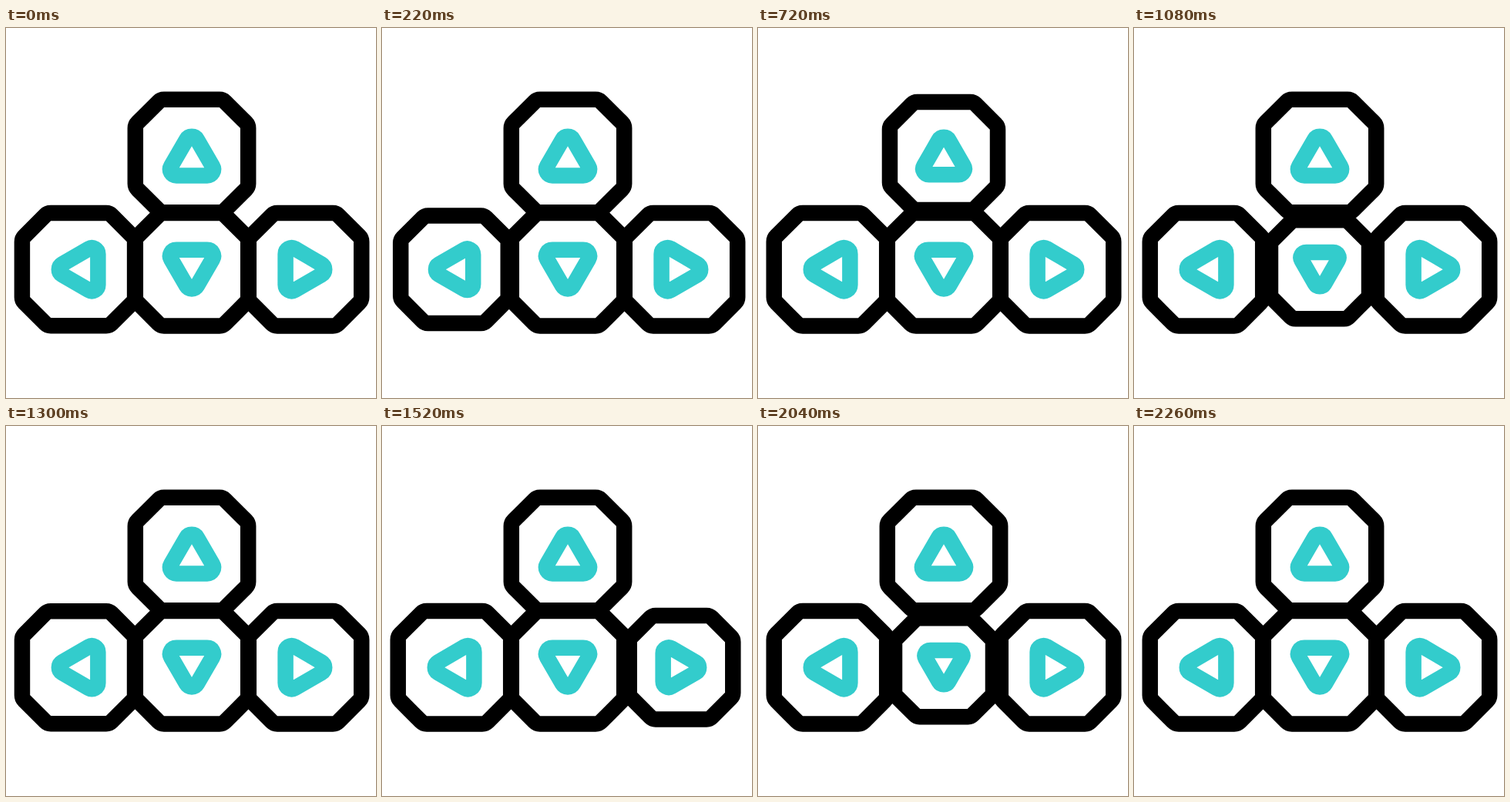
An HTML page with a canvas for the animation above (2400 ms loop, 480 by 480 pixels).

```html
<!DOCTYPE html>
<html lang="en">
<head>
<meta charset="utf-8">
<title>Arrow keys</title>
<style>
  html, body { margin: 0; width: 100%; height: 100%; overflow: hidden; background: #fff; }
  canvas { display: block; }
</style>
</head>
<body>
<canvas id="stage" width="480" height="480"></canvas>
<script>
const ctx = document.getElementById('stage').getContext('2d');
const LOOP = 2400, ROUND = 1100, STAGGER = 275;
// Each key is pressed twice: a slow tap, then a quick one.
const PRESS = [[0, 1], [100, 0.85], [200, 1], [267, 0.85], [333, 1]];

// In pressing order; turn is in quarter turns from "up".
const keys = [
  { x: 94, y: 313.2, turn: 3 },
  { x: 388, y: 313.2, turn: 1 },
  { x: 241, y: 166, turn: 0 },
  { x: 241, y: 313.2, turn: 2 }
];

const H = 73.2, F = 40.2;
const octagon = [[-F, -H], [F, -H], [H, -F], [H, F], [F, H], [-F, H], [-H, F], [-H, -F]];
const triangle = [[0, -33.2], [33.9, 25.4], [-33.9, 25.4]];

function pressScale(t) {
  for (let i = 1; i < PRESS.length; i++) {
    const [t0, s0] = PRESS[i - 1], [t1, s1] = PRESS[i];
    if (t >= t0 && t < t1) return s0 + (s1 - s0) * (t - t0) / (t1 - t0);
  }
  return 1;
}

function outline(points, radius, scale, color) {
  const p = points.map(([x, y]) => [x * scale, y * scale]);
  const n = p.length;
  ctx.beginPath();
  ctx.moveTo((p[0][0] + p[n - 1][0]) / 2, (p[0][1] + p[n - 1][1]) / 2);
  p.forEach((a, i) => ctx.arcTo(...a, ...p[(i + 1) % n], radius * scale));
  ctx.closePath();
  ctx.strokeStyle = color;
  ctx.stroke();
}

function draw(now) {
  const t = now % LOOP;
  ctx.fillStyle = '#fff';
  ctx.fillRect(0, 0, 480, 480);
  ctx.lineWidth = 20.5;
  ctx.lineJoin = 'round';
  keys.forEach(({ x, y, turn }, i) => {
    const local = t - i * STAGGER;
    const scale = pressScale(local < ROUND ? local : local - ROUND);
    ctx.save();
    ctx.translate(x, y);
    ctx.rotate(turn * Math.PI / 2);
    outline(octagon, 10, scale, '#000');
    outline(triangle, 8, scale, '#33cccc');
    ctx.restore();
  });
}

const start = performance.now();
function tick() {
  draw(performance.now() - start);
  requestAnimationFrame(tick);
}
tick();
</script>
</body>
</html>
```
